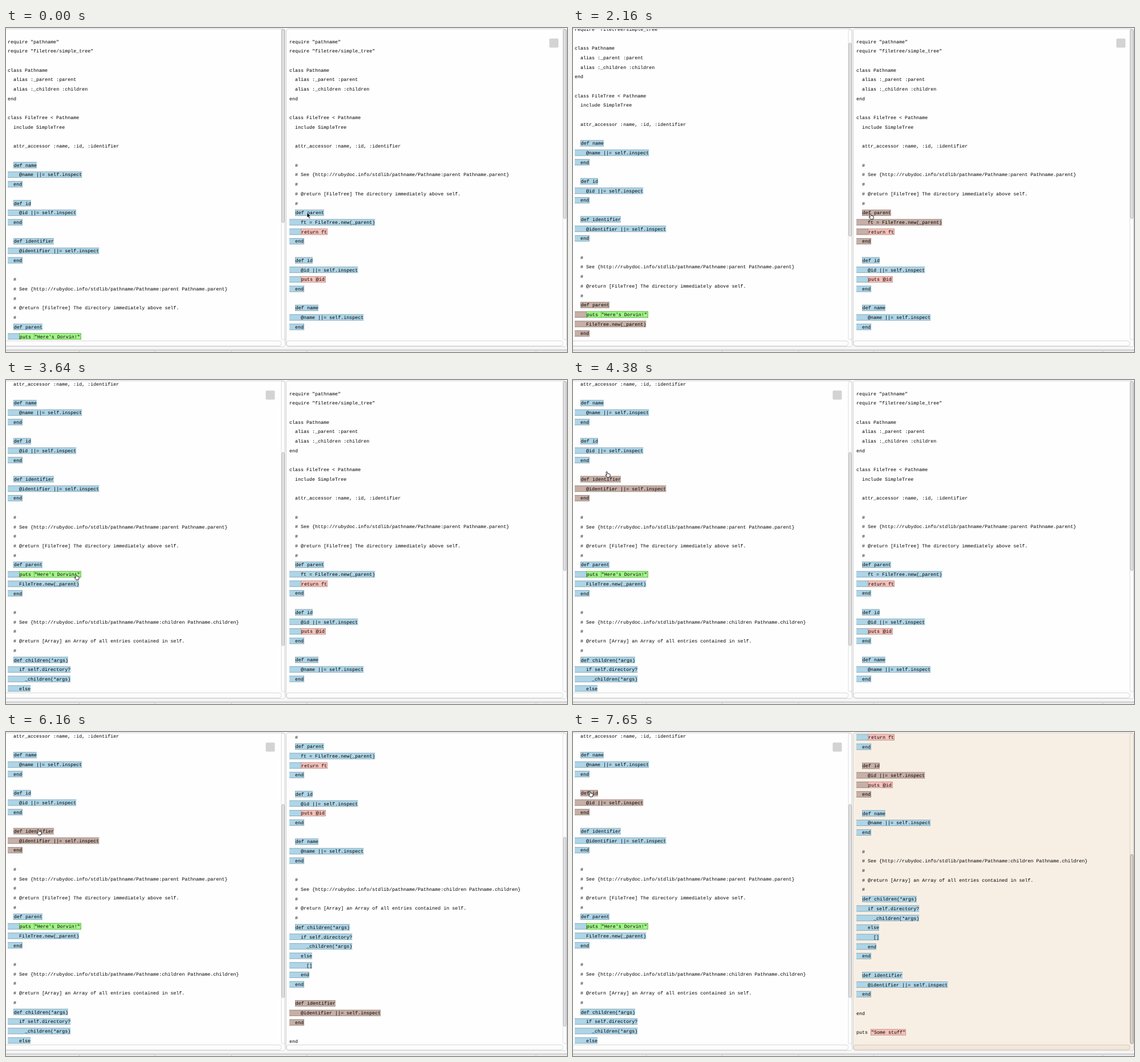
Recreate the animation shown at these times as an HTML page with a canvas. Size 984x569 px, loop 8000 ms.

```html
<!DOCTYPE html>
<html lang="en">
<head>
<meta charset="utf-8">
<title>Side by side diff</title>
<style>
html, body { margin: 0; width: 100%; height: 100%; overflow: hidden; background: #fff; }
canvas { display: block; }
</style>
</head>
<body>
<canvas id="stage" width="984" height="569"></canvas>
<script>
const ctx = document.getElementById('stage').getContext('2d');
const LOOP = 8000, CHAR = 5.01, LINE = 16.71, FIRST_LINE = 23.9, BORDER = 0.83;
const VIEW_TOP = 2, VIEW_BOTTOM = 548;
const BLUE = ['#aed5e7', '#86a5b3'], BROWN = ['#c6afa6', '#998680'];
const GREEN = ['#a1f787', '#5fae49'], PINK = ['#f6c1ba', '#b98a84'];

// "~" opens a changed span that runs to the end of its line.
const getter = name => [name, `  def ${name}`, `    @${name} ||= self.inspect`, '  end'];
const docs = (name, text) => ['  #',
  `  # See {http://rubydoc.info/stdlib/pathname/Pathname:${name} Pathname.${name}}`,
  '  #', `  # @return ${text}`, '  #'];
const header = ['require "pathname"', 'require "filetree/simple_tree"', '',
  'class Pathname', '  alias :_parent :parent', '  alias :_children :children', 'end', '',
  'class FileTree < Pathname', '  include SimpleTree', '',
  '  attr_accessor :name, :id, :identifier', ''];
const parentDocs = docs('parent', '[FileTree] The directory immediately above self.');
const children = [...docs('children', '[Array] an Array of all entries contained in self.'),
  ['children', '  def children(*args)', '    if self.directory?', '      _children(*args)',
    '    else', '      []', '    end', '  end'], ''];

// Plain strings are lines; arrays are a block name followed by its lines.
const flatten = items => items.flatMap(item => typeof item === 'string'
  ? [{ text: item }]
  : item.slice(1).map((text, i, all) =>
      ({ text, block: item[0], first: i === 0, last: i === all.length - 1 })));

const left = {
  x: 3, edge: -6, right: 489.5, thumb: 340, change: GREEN,
  lines: flatten([...header, getter('name'), '', getter('id'), '', getter('identifier'), '',
    ...parentDocs,
    ['parent', '  def parent', '    ~puts ~"Here\'s Dorvin!"', '    FileTree.new(_parent)', '  end'],
    '', ...children, 'end'])
};
const right = {
  x: 497, edge: 491.5, right: 983.5, thumb: 333, change: PINK,
  lines: flatten([...header, ...parentDocs,
    ['parent', '  def parent', '    ft = FileTree.new(_parent)', '    ~return ft', '  end'], '',
    ['id', '  def id', '    @id ||= self.inspect', '    ~puts ~@id', '  end'], '',
    getter('name'), '', ...children, getter('identifier'), '', 'end', '', 'puts ~"Some stuff"'])
};

// Pointer moves: start time, number of steps, end position.
const MOVES = [
  [960, 6, 521, 326], [2160, 1, 518, 325], [2900, 3, 185, 326], [3490, 2, 119, 340],
  [3790, 3, 105, 413], [4090, 3, 56, 160], [4530, 1, 59, 178], [4680, 3, 50, 175],
  [5280, 2, 53, 170], [6760, 7, 26, 103]
];
const STEP = 145;
const HOVERS = [[0, ''], [1110, 'parent'], [3490, ''], [4380, 'identifier'], [7200, 'id']];
const HAND = new Path2D('M2.5 1.2c.8-.6 1.4-.2 1.6.5l.8 3 1-.3 1 .3 1 .2c1 .1 1.3.8 1.3 1.8 ' +
  '0 1.7-.5 2.6-.8 4l-4.2.4c-.5-1-2-2.2-2.9-3.7-.5-.9.5-1.3 1.2-.7l.8.6-1.2-4.5c-.1-.6 0-1.2.4-1.6z');
const ARROW = new Path2D('M0 0V9.2L2.1 7.2 3.7 10.9 5.3 10.2 3.7 6.6H6.7Z');

const clamp = (v, lo, hi) => Math.min(hi, Math.max(lo, v));
const swing = p => 0.5 - Math.cos(Math.PI * clamp(p, 0, 1)) / 2;
const stepped = (t, first, step) => first + Math.floor((t - first) / step) * step;

function pointerAt(t) {
  let x = 528, y = 324;
  for (const [start, steps, toX, toY] of MOVES) {
    const p = clamp(Math.floor((t - start) / STEP) + 1, 0, steps) / steps;
    x += (toX - x) * p;
    y += (toY - y) * p;
  }
  return [x, y];
}

function fill(color, x, y, w, h) {
  ctx.fillStyle = color;
  ctx.fillRect(x, y, w, h);
}

function rounded(x, y, w, h, r, color, border) {
  ctx.beginPath();
  ctx.roundRect(x, y, w, h, r);
  ctx.fillStyle = color;
  ctx.fill();
  if (border) { ctx.strokeStyle = border; ctx.lineWidth = 1; ctx.stroke(); }
}

function mark([color, border], from, to, y, openLeft, openRight) {
  const top = y - 5.7, height = 10.85;
  fill(color, from, top, to - from, height);
  fill(border, from, top, to - from, BORDER);
  fill(border, from, top + height - BORDER, to - from, BORDER);
  if (!openLeft) fill(border, from, top, BORDER, height);
  if (!openRight) fill(border, to - BORDER, top, BORDER, height);
}

function write(text, x, y) {
  ctx.fillStyle = '#000';
  ctx.fillText(text, x, y + 2.6);
}

function drawLine(pane, line, y, hover) {
  const [plain, ...changed] = line.text.split('~');
  const indent = plain.search(/\S|$/);
  const border = line.first ? BORDER : 0;
  let x = pane.x + plain.length * CHAR;
  if (line.block) {
    const from = line.first ? pane.x + indent * CHAR : pane.x;
    mark(line.block === hover ? BROWN : BLUE, from, x + border + (line.last ? BORDER : 0), y,
      !line.first, !line.last);
  }
  write(plain.trimStart(), pane.x + indent * CHAR + border, y);
  const end = x + changed.join('').length * CHAR + changed.length * 2 * BORDER;
  for (const part of changed) {
    mark(pane.change, x, end, y);
    write(part, x + BORDER, y);
    x += part.length * CHAR + BORDER;
  }
}

function drawPane(pane, scroll, hover, tinted) {
  const paper = tinted ? '#f8efe4' : '#fefefe';
  const width = pane.right - pane.edge;
  rounded(pane.edge, 1.5, width, 558, 3, paper, '#cfcfcf');

  ctx.save();
  ctx.beginPath();
  ctx.rect(pane.edge + 1, VIEW_TOP, width - 8, VIEW_BOTTOM - VIEW_TOP);
  ctx.clip();
  pane.lines.forEach((line, i) => {
    const y = FIRST_LINE + i * LINE - scroll;
    if (y > -8 && y < 560) drawLine(pane, line, y, hover);
  });
  ctx.restore();

  const bar = pane.right - 6.5;
  const track = VIEW_BOTTOM - VIEW_TOP;
  const thumbY = VIEW_TOP + scroll * pane.thumb / track;
  rounded(bar, VIEW_TOP, 6, track, 3, paper, tinted ? '#ddd3c8' : '#dcdcdc');
  rounded(bar + 0.5, thumbY + 0.5, 5, pane.thumb - 1, 2.5,
    tinted ? '#d9d1c7' : '#dedede', tinted ? '#a8a199' : '#bdbdbd');
  rounded(pane.edge + 0.5, 549.5, width - 7, 8.5, 4,
    tinted ? '#f3e7d9' : '#fdfdfd', tinted ? '#d6cabd' : '#d6d6d6');
}

function drawFooter() {
  fill('#f4f4f4', 0, 561, 984, 4);
  fill('#b2b2b2', 0, 565, 984, 1.2);
  fill('#e8e8e8', 0, 566.2, 984, 3);
  for (const x of [128, 261, 395, 527, 929]) fill('#c4c4c4', x, 567, 1, 2);
}

function drawPointer(t) {
  const hand = t >= 960;
  const shape = hand ? HAND : ARROW;
  ctx.save();
  ctx.translate(...pointerAt(t));
  ctx.fillStyle = hand ? '#fff' : '#000';
  ctx.strokeStyle = hand ? '#000' : '#fff';
  ctx.lineWidth = hand ? 0.9 : 0.7;
  ctx.fill(shape);
  ctx.stroke(shape);
  ctx.restore();
}

function draw(t) {
  const leftScroll = 200.4 * swing((stepped(t, 2160, 146) - 2015.5) / 500);
  const rightScroll = Math.min(348.6, 601.7 * swing((stepped(t, 6020, 140) - 5911) / 500));
  const hover = HOVERS.findLast(([start]) => t >= start)[1];

  fill('#fff', 0, 0, 984, 569);
  ctx.font = '8.35px "Liberation Mono", monospace';
  ctx.textRendering = 'geometricPrecision';
  drawPane(left, leftScroll, hover, false);
  drawPane(right, rightScroll, hover, t >= 6300);
  drawFooter();
  rounded(t < 2900 ? 953 : 455.5, 18.5, 16, 16, 2, '#d3d3d3');
  drawPointer(t);
}

function frame() {
  draw(performance.now() % LOOP);
  requestAnimationFrame(frame);
}
frame();
</script>
</body>
</html>
```
